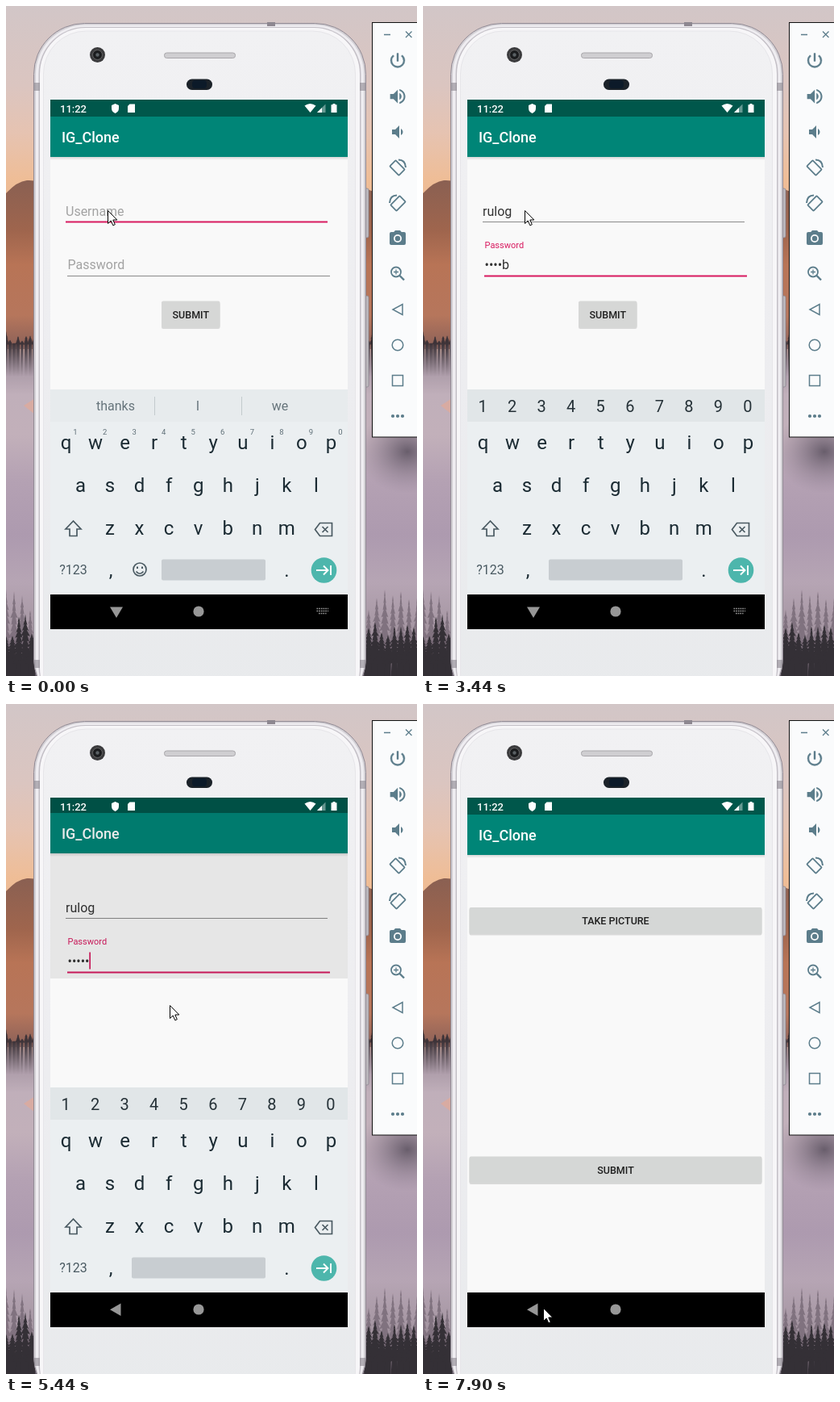
These frames come from a looping animation (510 px wide and 830 px high, 8000 ms). An HTML page:

```html
<!DOCTYPE html>
<html lang="en">
<head>
<meta charset="utf-8">
<title>Login demo</title>
<style>
  html, body { margin: 0; width: 100%; height: 100%; overflow: hidden; }
  svg { display: block; width: 100%; height: 100%; }
  text { font-family: Roboto, "Liberation Sans", sans-serif; font-size: 16px; white-space: pre; }
  .mid { text-anchor: middle; }
  .bar { font-size: 18px; font-weight: 500; fill: #fff; }
  .btn { font-size: 12.5px; font-weight: 500; fill: #1f1f1f; text-anchor: middle; }
  .key { font-size: 24px; fill: #1b2b33; text-anchor: middle; }
  .num { font-size: 20px; fill: #263238; text-anchor: middle; }
  .sup { font-size: 9.5px; fill: #607078; text-anchor: middle; }
  .word { fill: #66747b; text-anchor: middle; }
  .ico { fill: #5c7d8b; }
  .line { fill: none; stroke: #5c7d8b; stroke-width: 1.8; }
  .kline { fill: none; stroke: #4a5a62; stroke-width: 1.7; }
</style>
</head>
<body>
<svg viewBox="0 0 510 830" preserveAspectRatio="none">
  <defs>
    <linearGradient id="sky" x2="0" y2="1">
      <stop offset="0" stop-color="#d2c6c7"/><stop offset=".12" stop-color="#dbc5c0"/>
      <stop offset=".19" stop-color="#e6c3b1"/><stop offset=".26" stop-color="#efbd96"/>
      <stop offset=".5" stop-color="#d6a68c"/><stop offset=".54" stop-color="#a898a5"/>
      <stop offset=".58" stop-color="#c0afba"/><stop offset=".64" stop-color="#c2b0ba"/>
      <stop offset=".71" stop-color="#b4a1b3"/><stop offset=".79" stop-color="#ad9aaf"/>
      <stop offset=".86" stop-color="#b6a5b4"/><stop offset=".93" stop-color="#a596a2"/>
      <stop offset="1" stop-color="#5c5460"/>
    </linearGradient>
    <linearGradient id="hill" x2="0" y2="1">
      <stop offset="0" stop-color="#8a6052"/><stop offset=".3" stop-color="#9f654d"/>
      <stop offset=".5" stop-color="#b87456"/><stop offset=".8" stop-color="#b6765c"/>
      <stop offset="1" stop-color="#8a6058"/>
    </linearGradient>
    <linearGradient id="mist" x2="0" y2="1">
      <stop offset="0" stop-color="#a898a5" stop-opacity="0"/><stop offset="1" stop-color="#b3a2af"/>
    </linearGradient>
    <radialGradient id="smoke">
      <stop offset="0" stop-color="#5f5563" stop-opacity=".9"/><stop offset="1" stop-color="#8f8093" stop-opacity="0"/>
    </radialGradient>
    <linearGradient id="face" x2="0" y2="1">
      <stop offset="0" stop-color="#f1f1f3"/><stop offset=".5" stop-color="#ededf0"/>
      <stop offset="1" stop-color="#e8eaec"/>
    </linearGradient>
    <linearGradient id="shade" x2="0" y2="1">
      <stop offset="0" stop-color="#000" stop-opacity=".14"/><stop offset="1" stop-color="#000" stop-opacity="0"/>
    </linearGradient>
    <clipPath id="screen"><rect x="55" y="116" width="369" height="656"/></clipPath>
    <clipPath id="reveal"><rect id="revealBox" x="55" y="116" width="369" height="656"/></clipPath>
    <g id="appbar">
      <rect x="55" y="100" width="369" height="690" fill="#f9f9f9"/>
      <rect x="55" y="100" width="369" height="37" fill="#00574b"/>
      <rect x="55" y="137" width="369" height="50" fill="#008577"/>
      <rect x="55" y="187" width="369" height="4" fill="url(#shade)"/>
      <text class="bar" x="69" y="169">IG_Clone</text>
    </g>
  </defs>

  <!-- landscape -->
  <rect width="510" height="830" fill="url(#sky)"/>
  <path d="M0 232Q14 217 26 216T60 224H440L510 250V425H0Z" fill="url(#hill)"/>
  <g id="woods"></g>
  <rect y="418" width="510" height="42" fill="url(#mist)"/>
  <path d="M22 495L36 486V506Z" fill="#d8aba2"/>
  <ellipse cx="498" cy="552" rx="62" ry="52" fill="url(#smoke)"/>
  <g id="pines"></g>

  <!-- phone body -->
  <g fill="#bdb9be" stroke="#8f8992" stroke-width=".8">
    <rect x="445" y="226" width="5" height="61" rx="2"/>
    <rect x="445" y="359" width="5" height="113" rx="2"/>
  </g>
  <rect x="34.5" y="21.5" width="412" height="850" rx="63" fill="#d3d0d5" stroke="#918a94"/>
  <rect x="37" y="23.5" width="407" height="850" rx="61" fill="#efedf1"/>
  <rect x="40.5" y="26" width="400" height="850" rx="58" fill="#c3bfc6"/>
  <rect x="42" y="27" width="397" height="850" rx="57" fill="#f7f6f8"/>
  <rect x="46.5" y="31" width="387" height="850" rx="53" fill="url(#face)" stroke="#e6e5e9"/>
  <g fill="#8d8790">
    <rect x="324" y="20" width="10" height="5"/>
    <rect x="35" y="95" width="7" height="10" opacity=".6"/><rect x="439" y="95" width="7" height="10" opacity=".6"/>
    <rect x="35" y="810" width="7" height="10" opacity=".6"/><rect x="439" y="810" width="7" height="10" opacity=".6"/>
  </g>
  <circle cx="113.5" cy="60.5" r="9.5" fill="#3b3b3d"/>
  <circle cx="113.5" cy="60.5" r="6" fill="#1b1c1e" stroke="#666"/>
  <circle cx="113.5" cy="60.5" r="2.2" fill="#5a6064"/>
  <rect x="196.5" y="58" width="88" height="6.5" rx="3" fill="#cfced1" stroke="#a9a7ab"/>
  <rect x="224" y="90.5" width="32" height="13.5" rx="6.7" fill="#1b2229"/>
  <rect x="231" y="92" width="18" height="10" rx="4" fill="#0c1a29"/>

  <!-- screen -->
  <g clip-path="url(#screen)">
    <rect x="55" y="116" width="369" height="656"/>
    <g id="login">
      <use href="#appbar"/>
      <text id="hint" x="74" y="260" fill="#a2a2a2">Username</text>
      <text id="user" x="74" y="260" fill="#333"></text>
      <rect id="compose" x="74" y="262" height="1" fill="#444"/>
      <rect id="userLine" x="74" width="325"/>
      <text id="label" x="76.5">Password</text>
      <text id="pass" x="76.5" y="326" fill="#333"></text>
      <rect id="passLine" x="76" width="326"/>
      <rect id="caret" width="1.7" height="21" fill="#d81b60"/>
      <rect x="193" y="367" width="72.5" height="33" rx="2" fill="#000" opacity=".13"/>
      <rect id="submit" x="193" y="365.5" width="72.5" height="33" rx="2"/>
      <text class="btn" x="229.3" y="387">SUBMIT</text>
      <rect id="dim" x="55" y="100" width="369" height="690"/>
    </g>
    <rect x="55" y="729" width="369" height="43"/>
    <g id="next" clip-path="url(#reveal)">
      <g id="nextBody">
        <use href="#appbar"/>
        <g id="wide"></g>
        <rect x="55" y="729" width="369" height="50"/>
      </g>
    </g>
    <g id="board">
      <rect x="55" y="475" width="369" height="254" fill="#ebeff1"/>
      <rect id="strip" x="55" y="475" width="369" height="40"/>
      <g id="words">
        <path d="M184.5 484V507M292.5 484V507" stroke="#c3cacd"/>
      </g>
      <g id="digits"></g>
      <g id="keys"></g>
      <text x="83.5" y="704" class="mid" fill="#4a5a62">?123</text>
      <rect id="space" y="685.5" height="26" rx="2" fill="#c8cdd1"/>
      <g id="smile" class="kline">
        <circle cx="166" cy="698" r="8"/><path d="M161.5 700.5Q166 706 170.5 700.5"/>
        <path d="M163 694.5V697M169 694.5V697" stroke-width="2"/>
      </g>
      <path class="kline" d="M83.5 638L74 648H79V656.5H88V648H93Z"/>
      <path class="kline" d="M389.5 640.5H404.5V656.5H389.5L383.5 648.5ZM392.5 645L399.5 652M399.5 645L392.5 652"/>
      <circle cx="394.5" cy="699" r="15.8" fill="#4db6ac"/>
      <path d="M385 699H399M394 693.5L399.5 699L394 704.5M403 693V705" fill="none" stroke="#fff" stroke-width="1.9"/>
    </g>
    <g fill="#fff">
      <text x="67" y="131.5" style="font-size:13px;font-weight:500">11:22</text>
      <path d="M135.5 121L140 123V126.5Q140 131 135.5 133Q131 131 131 126.5V123Z"/>
      <path d="M153.5 121.5H160V132H151V124Z"/>
      <path d="M370.500 123.5Q377.5 118.5 384.5 123.5L377.5 132Z"/>
      <path d="M396.5 121.5V132H386Z" opacity=".4"/><path d="M392 126V132H386Z"/>
      <path d="M405.5 121H408.5V122.3H410.5V132H403.5V122.3H405.5Z"/>
    </g>
    <g fill="#979797">
      <path id="down" d="M129 744.5H145L137 758Z"/>
      <path id="back" d="M142.5 742.5V758L129 750.2Z"/>
      <circle cx="239" cy="750" r="6.6"/>
      <path id="kbIcon" d="M385.5 746.5H400M385.5 749.5H400M388 752.5H397.5" fill="none" stroke="#979797" stroke-width="1.5" stroke-dasharray="1.7 1"/>
    </g>
  </g>

  <!-- emulator tools -->
  <rect x="454.5" y="20.5" width="60" height="513.5" fill="#fafbfc" stroke="#111"/>
  <path d="M469 35.5H477M496 31.5L503.5 39M503.5 31.5L496 39" class="line" style="stroke-width:1.3"/>
  <g class="ico">
    <path transform="translate(474 55.5)" d="M13 3h-2v10h2V3zm4.83 2.17l-1.42 1.42A6.92 6.92 0 0 1 19 12c0 3.87-3.13 7-7 7A6.995 6.995 0 0 1 7.58 6.58L6.17 5.17A8.932 8.932 0 0 0 3 12a9 9 0 0 0 18 0c0-2.74-1.23-5.18-3.17-6.83z" stroke="#5c7d8b" stroke-width=".4"/>
    <path transform="translate(473.5 99.5) scale(1.05)" d="M3 9v6h4l5 5V4L7 9H3zm13.5 3c0-1.77-1.02-3.29-2.5-4.03v8.05c1.48-.73 2.5-2.25 2.5-4.02zM14 3.23v2.06c2.89.86 5 3.54 5 6.71s-2.11 5.85-5 6.71v2.06c4.01-.91 7-4.49 7-8.77s-2.99-7.86-7-8.77z"/>
    <path transform="translate(474 144)" d="M18.5 12c0-1.77-1.02-3.29-2.5-4.03v8.05c1.48-.73 2.5-2.25 2.5-4.02zM5 9v6h4l5 5V4L9 9H5z"/>
    <path transform="translate(474 276)" d="M9 2L7.17 4H4a2 2 0 0 0-2 2v12a2 2 0 0 0 2 2h16a2 2 0 0 0 2-2V6a2 2 0 0 0-2-2h-3.17L15 2H9z"/>
    <circle cx="486" cy="288" r="5" fill="#fafbfc"/><circle cx="486" cy="288" r="3.2"/>
    <circle cx="480" cy="508" r="2.1"/><circle cx="486" cy="508" r="2.1"/><circle cx="492" cy="508" r="2.1"/>
  </g>
  <g class="line">
    <g id="turn">
      <rect x="-8" y="-5.2" width="16" height="10.4" rx="1" transform="translate(-.5 .5) rotate(45)"/>
      <path d="M1 -9.5Q9.500 -9.500 10 0" stroke-width="2"/>
    </g>
    <circle cx="484" cy="329.5" r="6"/><path d="M488.5 334L494 339.5" stroke-width="2.4"/>
    <path d="M481 329.5H487M484 326.5V332.5" stroke-width="1.3"/>
    <path d="M492 369.5V382.5L480 376Z" stroke-width="1.5"/>
    <circle cx="486" cy="420" r="6.8" stroke-width="1.5"/>
    <rect x="479.5" y="457.5" width="13" height="13" stroke-width="1.5"/>
  </g>
  <path id="mouse" d="M.5 .5V16.5L4.2 13L6.8 18.8L9.3 17.7L6.8 12H11.8Z" fill="#fff" stroke="#000"/>
</svg>
<script>
const $ = id => document.getElementById(id);
const set = (node, attrs) => { for (const k in attrs) node.setAttribute(k, attrs[k]); };
const show = (id, on) => { $(id).style.display = on ? '' : 'none'; };

function add(parent, tag, attrs, text = '') {
  const node = document.createElementNS('http://www.w3.org/2000/svg', tag);
  set(node, attrs);
  node.textContent = text;
  return $(parent).appendChild(node);
}

// keyboard
const row = (parent, chars, cls, x, y) => [...chars].forEach((c, i) =>
  add(parent, 'text', { class: cls, x: x + i * 36.55, y }, c));
row('keys', 'qwertyuiop', 'key', 74.5, 549);
row('keys', 'asdfghjkl', 'key', 92.5, 601.5);
row('keys', 'zxcvbnm', 'key', 129, 654.5);
row('keys', ',', 'key', 130, 707);
row('keys', '.', 'key', 348.5, 707);
row('digits', '1234567890', 'num', 74, 503);
add('keys', 'g', { id: 'sups' });
row('sups', '1234567890', 'sup', 86, 531);
const words = [136, 238, 340].map(x => add('words', 'text', { class: 'word', x, y: 501 }));

// buttons of the second page
[['TAKE PICTURE', 252], ['SUBMIT', 560.5]].forEach(([name, y]) => {
  const box = { x: 57.5, width: 363, height: 33, rx: 2 };
  add('wide', 'rect', { ...box, y: y + 1.5, opacity: .13 });
  add('wide', 'rect', { ...box, y, fill: '#d5d7d6' });
  add('wide', 'text', { class: 'btn', x: 239, y: y + 21 }, name);
});

// rotate icons
set($('turn'), { transform: 'translate(486 200)' });
const turned = $('turn').cloneNode(true);
turned.id = 'turnBack';
set(turned, { transform: 'translate(486 244) scale(-1 1)' });
$('turn').after(turned);

// trees
let seed = 7;
const rnd = () => (seed = seed * 16807 % 2147483647) / 2147483647;
function pine(parent, x, top, base, w, fill) {
  const n = 9, h = (base - top) / n;
  let right = '', left = '';
  for (let i = 1; i <= n; i++) {
    const reach = w * (i / n) * (.6 + rnd() * .6), y = top + h * i;
    right += `L${x + reach} ${y}L${x + reach * .45} ${y - 1}`;
    left = `L${x - reach * .45} ${y - 1}L${x - reach} ${y}` + left;
  }
  add(parent, 'path', { d: `M${x} ${top}${right}V${base + 40}H${x - w * .5}${left}Z`, fill });
}
for (let x = 0; x < 510; x += 5) pine('woods', x, 403 + rnd() * 16, 420, 5, '#3d3338');
for (const [a, b] of [[0, 36], [450, 512]]) {
  for (let x = a; x < b; x += 10) pine('pines', x, 722 + rnd() * 30, 800, 9, '#80727f');
  for (let x = a; x < b; x += 8) pine('pines', x, 752 + rnd() * 30, 815, 12, '#343036');
}

// each step changes part of the state and then holds
const start = {
  user: '', words: ['thanks', 'I', 'we'], field: 'user', pass: '', label: 0, caret: false,
  mouse: [126, 253], button: '#d6d7d6', shift: 0, dim: 0, clip: 772, slide: 0, board: true, back: false
};
const steps = [
  [120, { user: 'r', words: ['r', 'are', 'right'], caret: true }],
  [520, { user: 'ru', words: ['ru', 'run', 'rules'] }],
  [640, { user: 'rul', words: ['rul', 'rule', 'rules'] }],
  [890, { user: 'rulo', words: ['rulo', 'rule', 'rug'] }],
  [1140, { user: 'rulog', words: ['rulog', 'rain', 'raining'] }],
  [1390, { field: 'pass', label: 1, caret: false }],
  [1530, { label: 2 }],
  [1900, { caret: true }],
  [2150, { pass: 'r' }],
  [2400, { pass: '•u' }],
  [2540, { pass: '••l' }],
  [2790, { pass: '•••i' }],
  [2910, { pass: '••••b' }],
  [3440, { caret: false }],
  [3560, { mouse: [140, 274] }],
  [3680, { mouse: [171, 330] }],
  [3800, { mouse: [190, 364] }],
  [3950, { mouse: [203, 373], caret: true }],
  [4100, { button: '#d0d2d1', pass: '•••••' }],
  [4220, { button: '#cbcdcc' }],
  [4340, { caret: false }],
  [5320, { button: '#bfc1c0', caret: true }],
  [5440, { shift: -2, dim: .08, clip: 340, back: true }],
  [5590, { shift: -10, dim: .1, clip: 126, slide: 3, board: false }],
  [5740, { clip: 116, slide: 0 }],
  [7490, { mouse: [160, 671] }],
  [7630, { mouse: [153, 735] }],
  [7750, { mouse: [151, 754] }],
  [7900, { mouse: [149, 748] }]
];
const labels = [
  { y: 326, size: 16, fill: '#a2a2a2' },
  { y: 305, size: 12, fill: '#d4487c' },
  { y: 300, size: 11, fill: '#d81b60' }
];

function underline(id, y, active) {
  set($(id), { y: active ? y - .5 : y, height: active ? 2 : 1, fill: active ? '#d81b60' : '#8a8a8a' });
}

function draw(s) {
  const typing = s.field === 'user', name = $('user'), pass = $('pass'), label = labels[s.label];
  name.textContent = s.user;
  pass.textContent = s.pass;
  show('hint', !s.user);
  const width = s.user ? name.getComputedTextLength() : 0;
  set($('compose'), { width: typing ? width : 0 });
  underline('userLine', 267, typing);
  underline('passLine', 334, !typing);
  set($('label'), { y: label.y, fill: label.fill });
  $('label').style.fontSize = label.size + 'px';
  show('caret', s.caret);
  set($('caret'), typing ? { x: 73.7 + width, y: 243.5 }
    : { x: 76.3 + (s.pass ? pass.getComputedTextLength() : 0), y: 309.5 });
  set($('submit'), { fill: s.button });

  words.forEach((w, i) => { w.textContent = s.words[i]; });
  ['words', 'sups', 'smile'].forEach(id => show(id, typing));
  show('digits', !typing);
  set($('strip'), { fill: typing ? '#e7ebed' : '#e1e6e8' });
  set($('space'), typing ? { x: 193, width: 129 } : { x: 156, width: 166 });
  show('board', s.board);

  set($('login'), { transform: `translate(0 ${s.shift})` });
  set($('dim'), { opacity: s.dim });
  show('next', s.clip < 772);
  set($('revealBox'), { y: s.clip, height: 772 - s.clip });
  set($('nextBody'), { transform: `translate(0 ${s.slide})` });
  show('back', s.back);
  show('down', !s.back);
  show('kbIcon', !s.back);
  set($('mouse'), { transform: `translate(${s.mouse})` });
}

const began = performance.now();
let shown = -1;
function tick() {
  const t = (performance.now() - began) % 8000;
  const count = steps.filter(([at]) => at <= t).length;
  if (count !== shown) {
    shown = count;
    draw(Object.assign({}, start, ...steps.slice(0, count).map(step => step[1])));
  }
  requestAnimationFrame(tick);
}
tick();
</script>
</body>
</html>
```
